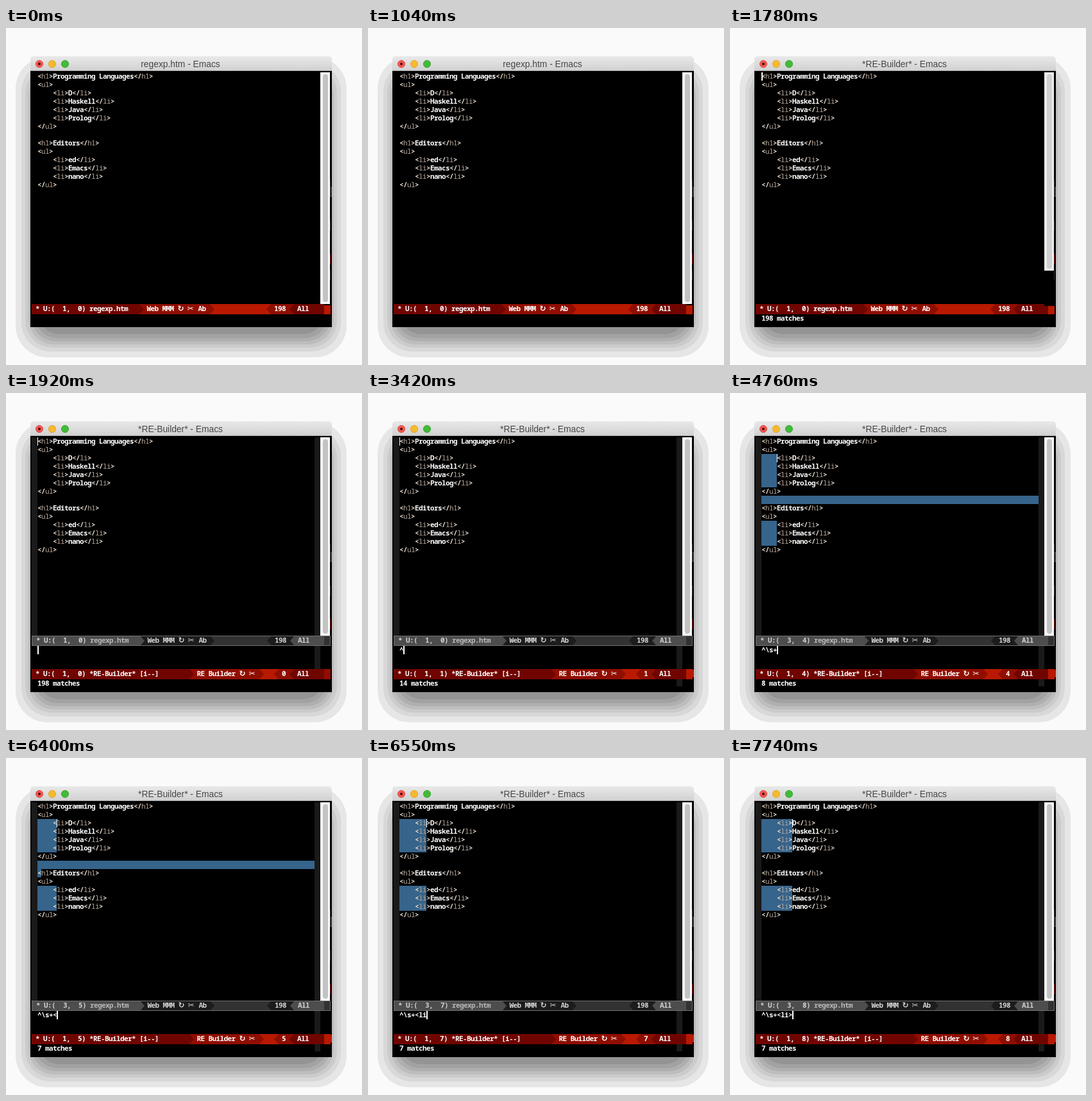
These frames come from a looping animation (555x525 px, 8000 ms). An HTML page with a canvas:

```html
<!DOCTYPE html>
<html lang="en">
<head>
<meta charset="utf-8">
<title>RE-Builder</title>
<style>
html, body { margin: 0; width: 555px; height: 525px; overflow: hidden; background: #fafafa; }
canvas { display: block; }
</style>
</head>
<body>
<canvas id="stage" width="555" height="525"></canvas>
<script>
const ctx = document.getElementById('stage').getContext('2d');
const LOOP = 8000, CELL = 6, ROW = 13, LEFT = 49, TOP = 69;
const MONO = '"Noto Sans Mono", "DejaVu Sans Mono", monospace';
const MATCH = '#36648b';

const item = s => `    <li>${s}</li>`;
const lines = [
  '<h1>Programming Languages</h1>', '<ul>',
  ...['D', 'Haskell', 'Java', 'Prolog'].map(item), '</ul>', '',
  '<h1>Editors</h1>', '<ul>',
  ...['ed', 'Emacs', 'nano'].map(item), '</ul>'
];

// Times at which the pattern grows to a given length
const pattern = '^\\s+<li>';
const typed = [[3420, 1], [4020, 3], [4760, 4], [6100, 5], [6550, 7], [6840, 8]];
// Times at which the cursor turns off and back on
const blinks = [[0, 440], [1040, 1480], [2370, 2820], [4620, 4760], [5210, 5660], [7290, 7740]];

const red = { dark: '#700500', mid: '#900e00', fill: '#b81900', text: '#ffffff', name: '#ffffff' };
const gray = { dark: '#4d4d4d', mid: '#1c1c1c', fill: '#323232', text: '#d2d2d2', name: '#b8b8b8' };

function box(x, y, w, h, color) {
  ctx.fillStyle = color;
  ctx.fillRect(x, y, w, h);
}

function round(x, y, w, h, r, color) {
  ctx.fillStyle = color;
  ctx.beginPath();
  ctx.roundRect(x, y, w, h, r);
  ctx.fill();
}

function poly(points, color) {
  ctx.fillStyle = color;
  ctx.beginPath();
  points.forEach(([x, y]) => ctx.lineTo(x, y));
  ctx.fill();
}

function mono(s, x, y, color, bold = true) {
  ctx.font = `${bold ? 'bold ' : ''}11px ${MONO}`;
  ctx.letterSpacing = '-0.6px';
  ctx.fillStyle = color;
  ctx.fillText(s, x, y);
  ctx.letterSpacing = '0px';
}

function icon(s, x, y, color) {
  ctx.font = 'bold 12px "DejaVu Sans", sans-serif';
  ctx.fillStyle = color;
  ctx.fillText(s, x, y);
}

function shadow() {
  const layers = [[23, 230], [14, 216], [8, 203], [3, 189], [-2, 175], [-7, 162], [-13, 148]];
  for (const [d, v] of layers) {
    round(38 - d, 68 - d, 470 + 2 * d, 422 + 2 * d, 38 + d / 2, `rgb(${v},${v},${v})`);
  }
}

function titleBar(title) {
  const g = ctx.createLinearGradient(0, 44, 0, 66);
  g.addColorStop(0, '#e9e9e9');
  g.addColorStop(1, '#d1d1d1');
  round(38, 44, 470, 23, [5, 5, 0, 0], g);
  box(38, 66, 470, 1, '#aaaaaa');
  [['#f5564f', '#d9423c'], ['#f7b92e', '#dd9d20'], ['#41bb38', '#2d9d28']].forEach(([fill, rim], i) => {
    ctx.beginPath();
    ctx.arc(52 + 20 * i, 56, 5.6, 0, 7);
    ctx.fillStyle = fill;
    ctx.fill();
    ctx.strokeStyle = rim;
    ctx.lineWidth = 0.8;
    ctx.stroke();
  });
  ctx.beginPath();
  ctx.arc(52, 56, 2, 0, 7);
  ctx.fillStyle = '#3c0604';
  ctx.fill();
  ctx.font = '13.8px "Liberation Sans", Arial, sans-serif';
  ctx.textAlign = 'center';
  ctx.fillStyle = '#474747';
  ctx.fillText(title, 272, 61);
  ctx.textAlign = 'left';
}

function windowFrame(title) {
  box(38, 66, 470, 400, '#000');
  titleBar(title);
  for (const [y, h] of [[236, 12], [300, 16], [378, 15]]) box(505, y, 1, h, '#333');
  box(505, 352, 1, 16, '#8a1400');
  ctx.strokeStyle = '#484848';
  ctx.lineWidth = 1;
  ctx.strokeRect(505.5, 248.5, 2, 14);
}

function code() {
  lines.forEach((line, row) => {
    let col = 0;
    for (const part of line.match(/<\/?|\w+(?=>)|>|[^<>]+/g) || []) {
      const x = LEFT + col * CELL, y = TOP + row * ROW + 10;
      if (/[<>]/.test(part)) mono(part, x, y, '#e8ded2');
      else if (line[col + part.length] === '>') mono(part, x, y, '#b5a395', false);
      else mono(part, x, y, '#ffffff');
      col += part.length;
    }
  });
}

function highlight(size) {
  if (size < 3) return;
  const cols = size === 3 ? 1 : size;
  lines.forEach((line, row) => {
    const y = TOP + row * ROW;
    if (line[0] === ' ') box(LEFT, y, cols * CELL, ROW, MATCH);
    if (!line && size < 6) {
      box(LEFT, y, 432, ROW, MATCH);
      if (size === 5) box(LEFT, y + ROW, CELL, ROW, MATCH);
    }
  });
}

function scrollBar(bottom, back, thumb) {
  box(490, TOP, 15, bottom - TOP, back);
  round(494, 72, 8, bottom - 75, 4, thumb);
}

// Segments: dark head, mid modes, fill, mid size, dark place
function modeLine(o) {
  const { y, c, x } = o, h = 16, m = y + h / 2, b = y + h;
  const right = (end, color) => poly([[40, y], [end, y], [end + 7, m], [end, b], [40, b]], color);
  const left = (tip, color) => poly([[496, y], [tip + 7, y], [tip, m], [tip + 7, b], [496, b]], color);
  box(40, y, 466, h, c.fill);
  right(o.modeEnd, c.mid);
  right(o.headEnd, c.dark);
  left(o.sizeTip, c.mid);
  left(442 + x, c.dark);
  const base = y + 11;
  const pos = `* U:(${String(o.line).padStart(3)},${String(o.col).padStart(3)}) `;
  mono(pos, 46 + x, base, c.text);
  mono(o.name, 130 + x, base, c.name);
  mono(o.mode, o.modeX, base, c.text);
  const ix = o.modeX + o.mode.length * CELL + 6;
  icon('\u21bb', ix, base, c.text);
  icon('\u2702', ix + 15, base, c.text);
  if (o.tail) mono(o.tail, ix + 32, base, c.text);
  mono(String(o.size), 436 + x - String(o.size).length * CELL, base, c.text);
  mono('All', 454 + x, base, c.text);
}

function fileMode(y, c, x, line, col) {
  modeLine({
    y, c, x, line, col, name: 'regexp.htm', mode: 'Web MMM', tail: 'Ab', size: 198,
    modeX: 219.5 + x, headEnd: 208 + x, modeEnd: 318, sizeTip: 406 + x
  });
}

function builderMode(size) {
  modeLine({
    y: 430, c: red, x: 0, line: 1, col: size, name: '*RE-Builder* [i--]',
    mode: 'RE Builder', size, modeX: 297.5, headEnd: 286, modeEnd: 395, sizeTip: 418
  });
  if (size) box(496, 431, 12, 12, red.fill);
  else box(496, 430, 10, 16, red.mid);
}

function message(t) {
  if (t < 1780) return;
  const n = t < 3420 ? 198 : t < 4020 ? 14 : t < 6400 ? 8 : 7;
  mono(`${n} matches`, LEFT, 456, '#fff');
}

function singlePane(t, on) {
  const opening = t >= 1780;
  code();
  if (on) box(LEFT, TOP, 2, ROW, '#fff');
  if (opening) scrollBar(378, '#ececec', '#d0d0d0');
  else scrollBar(430, '#f8f8f8', '#c3c3c3');
  fileMode(430, red, 0, 1, 0);
  if (opening) box(490, 430, 16, 3, '#000');
  else box(496, 430, 10, 2, '#000');
}

function splitPane(size, on) {
  box(40, TOP, 9, 309, '#1a1a1a');
  box(481, TOP, 9, 309, '#1a1a1a');
  box(481, 394, 9, 36, '#1a1a1a');
  if (size) box(481, 446, 9, 11, '#1a1a1a');
  highlight(size);
  code();
  const found = size >= 3, col = size === 3 ? 1 : found ? size : 0;
  box(LEFT + col * CELL, found ? TOP + 2 * ROW : TOP, 1, ROW, '#fff');
  scrollBar(378, '#f8f8f8', '#c3c3c3');
  fileMode(378, gray, 1, found ? 3 : 1, col);
  ctx.strokeStyle = '#707070';
  ctx.lineWidth = 1;
  ctx.strokeRect(40.5, 378.5, 465, 15);
  mono(pattern.slice(0, size), LEFT, 404, '#fff');
  if (on) box(LEFT + size * CELL, 394, 2, ROW, '#fff');
  builderMode(size);
}

function draw(t) {
  const size = typed.reduce((n, [at, len]) => t >= at ? len : n, 0);
  const on = !blinks.some(([a, b]) => t >= a && t < b);
  box(0, 0, 555, 525, '#fafafa');
  shadow();
  windowFrame(t < 1780 ? 'regexp.htm - Emacs' : '*RE-Builder* - Emacs');
  if (t < 1920) singlePane(t, on);
  else splitPane(size, on);
  message(t);
}

const start = performance.now();
function tick(now) {
  draw(Math.max(0, now - start) % LOOP);
  requestAnimationFrame(tick);
}
draw(0);
requestAnimationFrame(tick);
</script>
</body>
</html>
```
